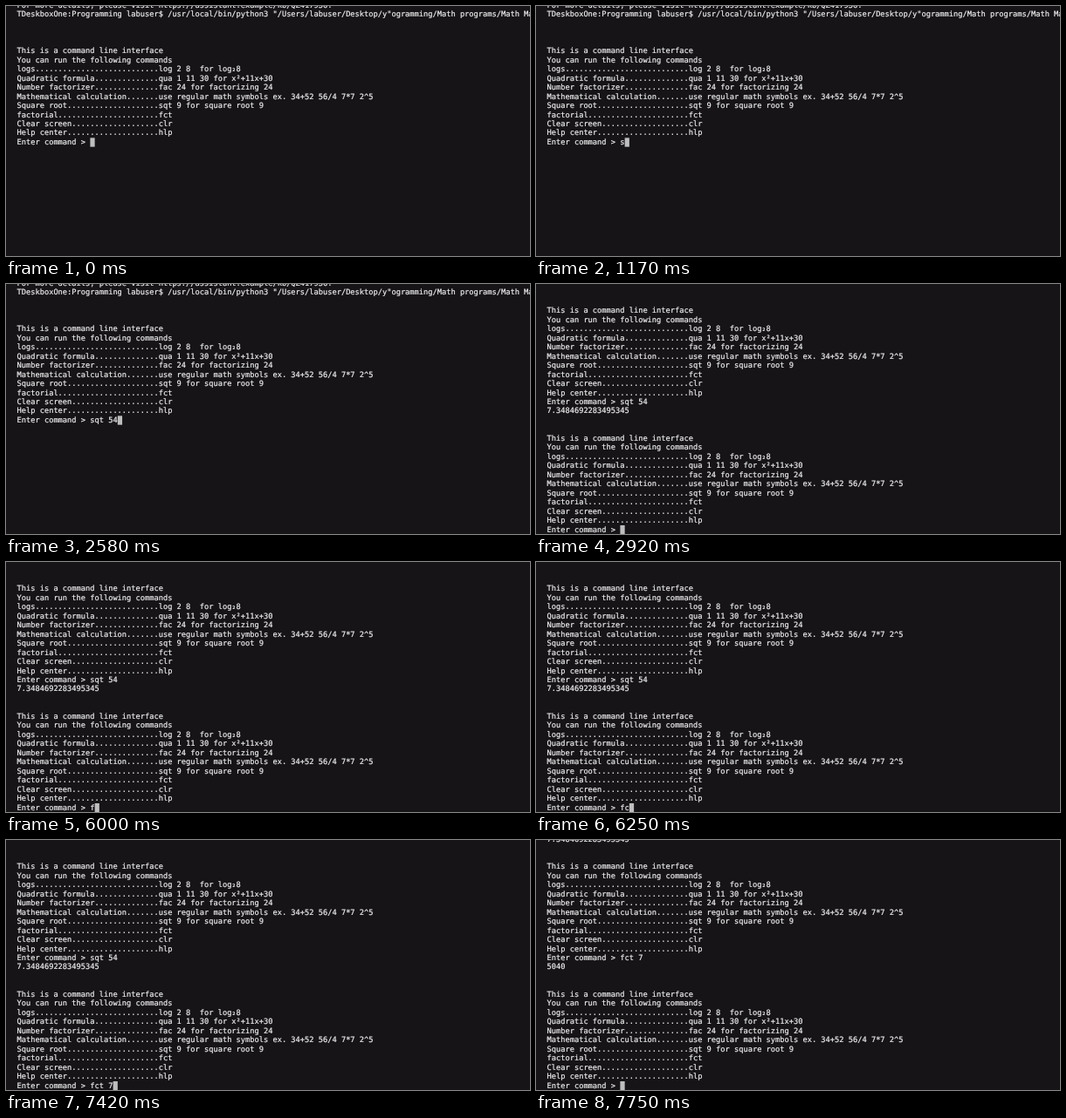
These frames come from a looping animation (600 px wide and 287 px high, 8 s). An HTML page:

```html
<!DOCTYPE html>
<html lang="en">
<head>
<meta charset="utf-8">
<title>Command line calculator</title>
<style>
  html, body { margin: 0; width: 100%; height: 100%; overflow: hidden; background: #161417; }
  svg { display: block; width: 100%; height: 100%; }
  text {
    font: 8.704px "DejaVu Sans Mono", monospace;
    fill: #eeedee;
    stroke: #eeedee;
    stroke-width: 0.22px;
    white-space: pre;
    text-rendering: geometricPrecision;
  }
</style>
</head>
<body>
<svg viewBox="0 0 600 287">
  <rect width="600" height="287" fill="#161417"/>
  <rect id="cursor" width="5.24" height="10.3" fill="#bfbebf"/>
  <g id="screen"></g>
</svg>
<script>
const LOOP = 8000, LEFT = 12.56, CHAR = 5.24, TOP = 1.9, LINE = 10.47, ROWS = 28;
const PROMPT = 'Enter command > ';

const row = (name, help) => name.padEnd(31, '.') + help;
const MENU = [
  'This is a command line interface',
  'You can run the following commands',
  row('logs', 'log 2 8  for log₂8'),
  row('Quadratic formula', 'qua 1 11 30 for x²+11x+30'),
  row('Number factorizer', 'fac 24 for factorizing 24'),
  row('Mathematical calculation', 'use regular math symbols ex. 34+52 56/4 7*7 2^5'),
  row('Square root', 'sqt 9 for square root 9'),
  row('factorial', 'fct'),
  row('Clear screen', 'clr'),
  row('Help center', 'hlp')
];
const HEADER = [
  'For more details, please visit https://assistant.example/kb/QZ417936.',
  'TDeskboxOne:Programming labuser$ /usr/local/bin/python3 "/Users/labuser/Desktop/y"ogramming/Math programs/Math Ma',
  '', '', ''
];
const COMMANDS = [
  { text: 'sqt 54', keys: [1170, 1420, 1670, 1920, 2420, 2580], enter: 2920, result: '7.3484692283495345' },
  { text: 'fct 7', keys: [6000, 6250, 6500, 6750, 7420], enter: 7750, result: '5040' }
];

const screen = document.getElementById('screen');
const cursor = document.getElementById('cursor');
const texts = Array.from({ length: ROWS }, (_, i) => {
  const el = document.createElementNS('http://www.w3.org/2000/svg', 'text');
  el.setAttribute('x', LEFT);
  el.setAttribute('y', Math.round(TOP + i * LINE));
  return screen.appendChild(el);
});

function transcript(t) {
  const lines = [...HEADER, ...MENU];
  for (const c of COMMANDS) {
    lines.push(PROMPT + c.text.slice(0, c.keys.filter(k => k <= t).length));
    if (t < c.enter) return lines;
    lines.push(c.result, '', '', ...MENU);
  }
  lines.push(PROMPT);
  return lines;
}

function draw(t) {
  const lines = transcript(t);
  const view = lines.slice(-ROWS);
  texts.forEach((el, i) => {
    const s = view[i] || '';
    if (el.textContent !== s) el.textContent = s;
  });
  const last = view.length - 1;
  cursor.setAttribute('x', LEFT + view[last].length * CHAR);
  cursor.setAttribute('y', TOP + last * LINE - 7.6);
}

const start = performance.now();
function tick(now) {
  draw(Math.max(0, now - start) % LOOP);
  requestAnimationFrame(tick);
}
draw(0);
requestAnimationFrame(tick);
</script>
</body>
</html>
```
